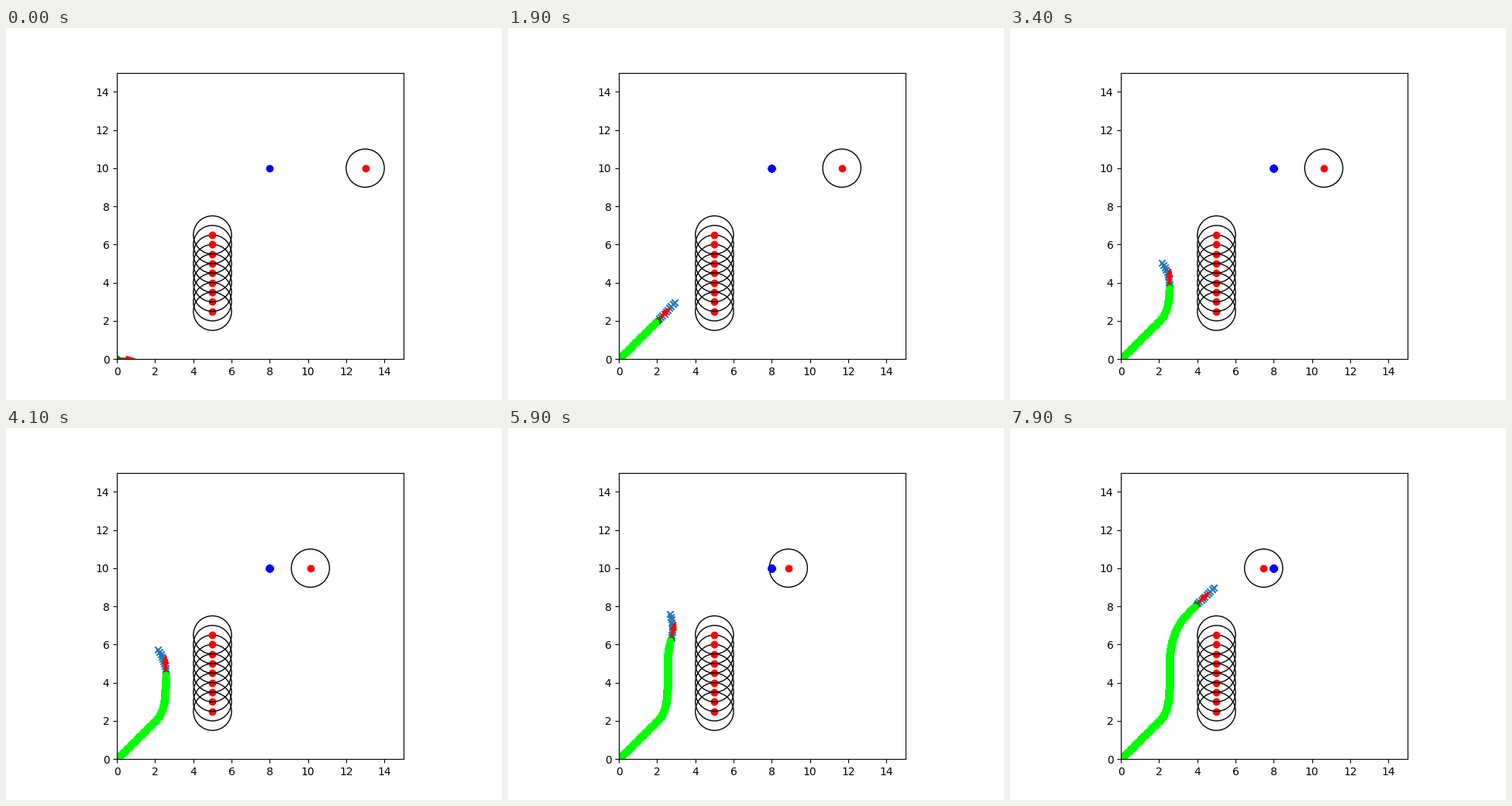
A matplotlib script that plays this animation: 640 px wide and 480 px high, repeating every 8 s.

```python
import numpy as np
import matplotlib.pyplot as plt
from matplotlib.animation import FuncAnimation
from matplotlib.patches import Circle, FancyArrow

FRAMES, INTERVAL = 80, 100
OBSTACLE_STEP = 0.07
REACH = 1.31
HORIZON = np.linspace(0.1, 1, 10)[:, None]


def logistic(t):
    return 1 / (1 + np.exp(-t))


def direction(degrees):
    a = np.radians(degrees)
    return np.column_stack([np.cos(a), np.sin(a)])


# Drive diagonally, turn upwards beside the column, then ease back to the goal.
t = np.arange(FRAMES)
turn_up = 45 * (1 - np.exp(-np.clip(t - 19, 0, None) / 4.5))
turn_back = 46 * np.clip((t - 45) / 30, 0, 1) ** 1.3
angle = 45 + turn_up - turn_back
speed = 0.1 + 0.05 * logistic(26.5 - t) + 0.03 * logistic(t - 72)
velocity = speed[:, None] * direction(angle)
pos = np.vstack([(0, 0), np.cumsum(velocity, axis=0)[:-1]])
heading = np.vstack([(1, 0), direction(angle)[:-1]])

# While passing the column the plan swerves away from it.
swerve = 18 * (logistic(t - 21) - logistic(t - 71))
plan_end = REACH * direction(angle + swerve)


def plan(i):
    """Curve that leaves along the heading and bends to the plan's end."""
    s = HORIZON
    return pos[i] + 2 * s * (1 - s) * 0.62 * heading[i] + s**2 * plan_end[i]


fig, ax = plt.subplots(figsize=(6.4, 4.8), dpi=100)
ax.set_aspect("equal")
ax.set_xlim(0, 15)
ax.set_ylim(0, 15)
ax.set_xticks(range(0, 15, 2))
ax.set_yticks(range(0, 15, 2))


def add_obstacle(x, y):
    ring = ax.add_patch(Circle((x, y), 1, fill=False, color="black", lw=1))
    dot, = ax.plot([x], [y], "o", color="red", zorder=1)
    return ring, dot


robot, = ax.plot([], [], "o", color="green")
trail, = ax.plot([], [], "o", color="lime")
goal, = ax.plot([], [], "o", color="blue")
for y in np.arange(2.5, 7, 0.5):
    add_obstacle(5, y)
ring, dot = add_obstacle(13, 10)
marks = ax.scatter([], [], marker="x", color="C0", zorder=1)
arrow = ax.add_patch(FancyArrow(0, 0, 0.5, 0, width=0.1, color="red",
                                zorder=1.5))


def update(i):
    x = 13 - OBSTACLE_STEP * i
    ring.center = x, 10
    dot.set_data([x], [10])
    # Goal and trail are stamped again each step, which hardens their edges.
    goal.set_data([8] * (i + 1), [10] * (i + 1))
    trail.set_data(*np.repeat(pos[:i], np.arange(i, 0, -1), axis=0).T)
    robot.set_data(*pos[i:i + 1].T)
    marks.set_offsets(plan(i))
    marks.set_visible(i > 0)
    dx, dy = 0.5 * heading[i]
    arrow.set_data(x=pos[i, 0], y=pos[i, 1], dx=dx, dy=dy)
    return ring, dot, goal, trail, robot, marks, arrow


anim = FuncAnimation(fig, update, frames=FRAMES, interval=INTERVAL,
                     repeat=True, repeat_delay=0)
plt.show()
```
